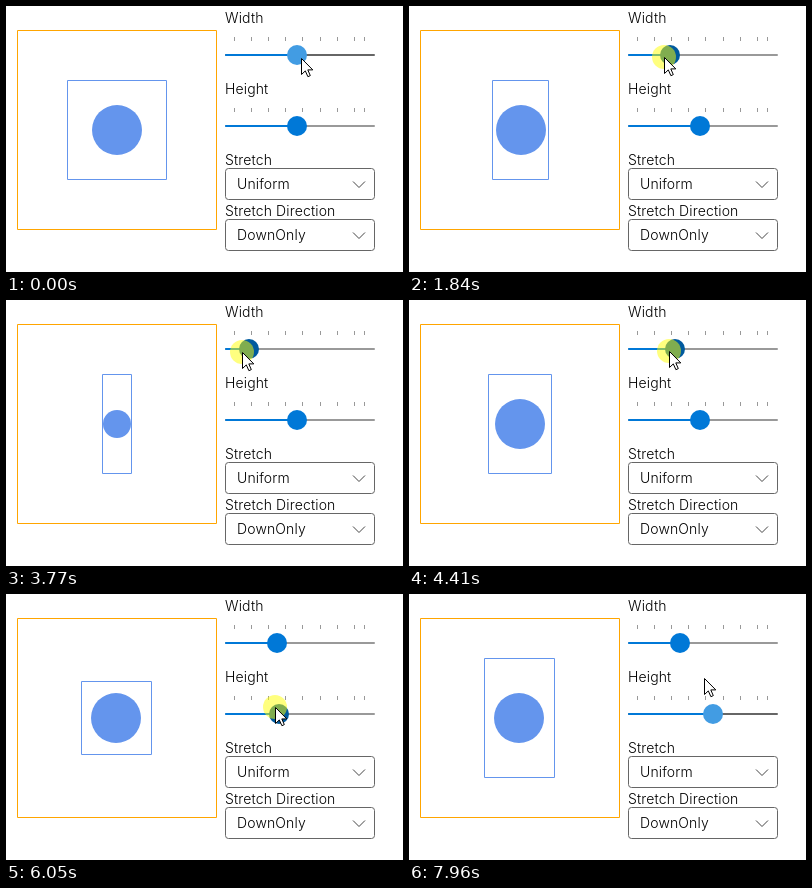
Write an HTML page with a canvas that moves like this. It is 397x266 px and loops after 8000 ms.

```html
<!DOCTYPE html>
<html lang="en">
<head>
<meta charset="utf-8">
<title>Viewbox sliders</title>
<style>
  html, body { margin: 0; width: 100%; height: 100%; overflow: hidden; background: #fff; }
  canvas { display: block; }
</style>
</head>
<body>
<canvas id="stage" width="397" height="266"></canvas>
<script>
const ctx = document.getElementById('stage').getContext('2d');
const LOOP = 8000;
const ACCENT = '#0078d7', HOVER = '#429ce3', PRESSED = '#005a9e', SHAPE = '#6495ed';
const AREA = { x: 11, y: 24, size: 200 };
const SLIDER = { x: 219, length: 150, thumb: 10, min: 10, max: 200, step: 25 };
const RANGE = SLIDER.max - SLIDER.min;
const TRAVEL = SLIDER.length - 2 * SLIDER.thumb;
const FIRST = SLIDER.x + SLIDER.thumb;
const REST = 290.6;

const during = (t, from, to) => t >= from && t < to;
const mix = (a, b, p) => a + (b - a) * p;

// Progress 0..1 of a hand movement that slows down towards its end
function glide(t, from, to, power = 1.25) {
  const p = Math.min(1, Math.max(0, (t - from) / (to - from)));
  return 1 - (1 - p) ** power;
}

const widthThumb = t => REST
  - 30.1 * glide(t, 290, 1910)
  - 17.7 * glide(t, 1930, 3330)
  + 28.2 * glide(t, 3770, 4640);

const heightThumb = t => REST
  - 44.5 * glide(t, 5660, 6840)
  + 57.9 * glide(t, 7090, 7700);

// The pointer runs ahead of the thumb the further it is dragged left
function cursorAt(t, widthX, heightX) {
  const pull = x => Math.max(0, REST - x);
  const ahead = x => x - 1.05 * Math.sqrt(pull(x));
  const travel = glide(t, 4850, 5400, 3);
  const arc = 12 * Math.sin(Math.PI * glide(t, 4850, 5400, 1));
  const settle = 1 - glide(t, 40, 80, 1);
  const leave = glide(t, 7880, 7960, 1);
  return {
    x: Math.round(mix(ahead(widthX), ahead(heightX), travel) + arc + 4 * settle - 9 * leave),
    y: Math.round(mix(49.5 + pull(widthX) / 23, 113.4, travel) + 2 * settle - 29 * leave)
  };
}

// Layout rounding: halves go to the even neighbour
function roundEven(v) {
  const low = Math.floor(v);
  return v - low === 0.5 ? low + low % 2 : Math.round(v);
}

function sliderValue(x) {
  return Math.round(SLIDER.min + (x - FIRST) / TRAVEL * RANGE);
}

function rect(x, y, w, h, color, radius = 0) {
  ctx.fillStyle = color;
  ctx.beginPath();
  ctx.roundRect(x, y, w, h, radius);
  ctx.fill();
}

function outline(x, y, w, h, color, radius = 0) {
  ctx.strokeStyle = color;
  ctx.lineWidth = 1;
  ctx.beginPath();
  ctx.roundRect(x + 0.5, y + 0.5, w - 1, h - 1, radius);
  ctx.stroke();
}

function disc(x, y, r, color) {
  ctx.fillStyle = color;
  ctx.beginPath();
  ctx.arc(x, y, r, 0, Math.PI * 2);
  ctx.fill();
}

function label(text, x, y) {
  ctx.font = '300 14px Inter, sans-serif';
  ctx.letterSpacing = '0.14px';
  ctx.fillStyle = '#000';
  ctx.fillText(text, x, y);
}

function drawPreview(w, h) {
  outline(AREA.x, AREA.y, AREA.size, AREA.size, '#ffa500');
  const x = AREA.x + roundEven((AREA.size - w) / 2);
  const y = AREA.y + roundEven((AREA.size - h) / 2);
  outline(x, y, w, h, SHAPE);
  const d = Math.min(50, w - 2, h - 2);
  disc(x + roundEven((w - d) / 2) + d / 2, y + roundEven((h - d) / 2) + d / 2, d / 2, SHAPE);
}

function drawSlider(name, top, thumbX, state) {
  label(name, SLIDER.x, top + 17);
  const y = top + 49, x = Math.round(thumbX);
  for (let v = SLIDER.min; v < SLIDER.max + SLIDER.step; v += SLIDER.step) {
    const part = (Math.min(v, SLIDER.max) - SLIDER.min) / RANGE;
    rect(Math.round(FIRST + part * TRAVEL) - 1, top + 31, 1, 4, '#999');
  }
  rect(SLIDER.x, y - 1, SLIDER.length, 2, state === 'hover' ? '#666' : '#999', 1);
  rect(SLIDER.x, y - 1, x - SLIDER.x, 2, ACCENT, 1);
  disc(x, y, SLIDER.thumb, state === 'hover' ? HOVER : state === 'pressed' ? PRESSED : ACCENT);
}

function drawCombo(name, value, top) {
  label(name, SLIDER.x, top - 3);
  outline(SLIDER.x, top, SLIDER.length, 32, '#666', 3);
  label(value, SLIDER.x + 12, top + 21);
  ctx.strokeStyle = '#444';
  ctx.beginPath();
  ctx.moveTo(347, top + 13.5);
  ctx.lineTo(353, top + 19.5);
  ctx.lineTo(359, top + 13.5);
  ctx.stroke();
}

const arrow = new Path2D('M.5 .5V16.5L4.3 12.9L6.9 18.7L9.3 17.6L6.8 11.9H11.8Z');

function drawCursor({ x, y }, down) {
  if (down) disc(x, y, 12, 'rgba(255,255,0,.5)');
  ctx.save();
  ctx.translate(x, y);
  ctx.fillStyle = '#fff';
  ctx.strokeStyle = '#000';
  ctx.lineWidth = 1;
  ctx.fill(arrow);
  ctx.stroke(arrow);
  ctx.restore();
}

function draw(t) {
  const widthX = widthThumb(t), heightX = heightThumb(t);
  const widthDown = during(t, 290, 4850), heightDown = during(t, 5480, 7740);
  const widthState = widthDown ? 'pressed' : t < 5000 ? 'hover' : 'rest';
  const heightState = heightDown ? 'pressed' : t > 5080 ? 'hover' : 'rest';

  rect(0, 0, 397, 266, '#fff');
  drawPreview(sliderValue(widthX), sliderValue(heightX));
  drawSlider('Width', 0, widthX, widthState);
  drawSlider('Height', 71, heightX, heightState);
  drawCombo('Stretch', 'Uniform', 162);
  drawCombo('Stretch Direction', 'DownOnly', 213);
  drawCursor(cursorAt(t, widthX, heightX), widthDown || heightDown);
}

const start = performance.now();
function tick() {
  draw((performance.now() - start) % LOOP);
  requestAnimationFrame(tick);
}
tick();
</script>
</body>
</html>
```
